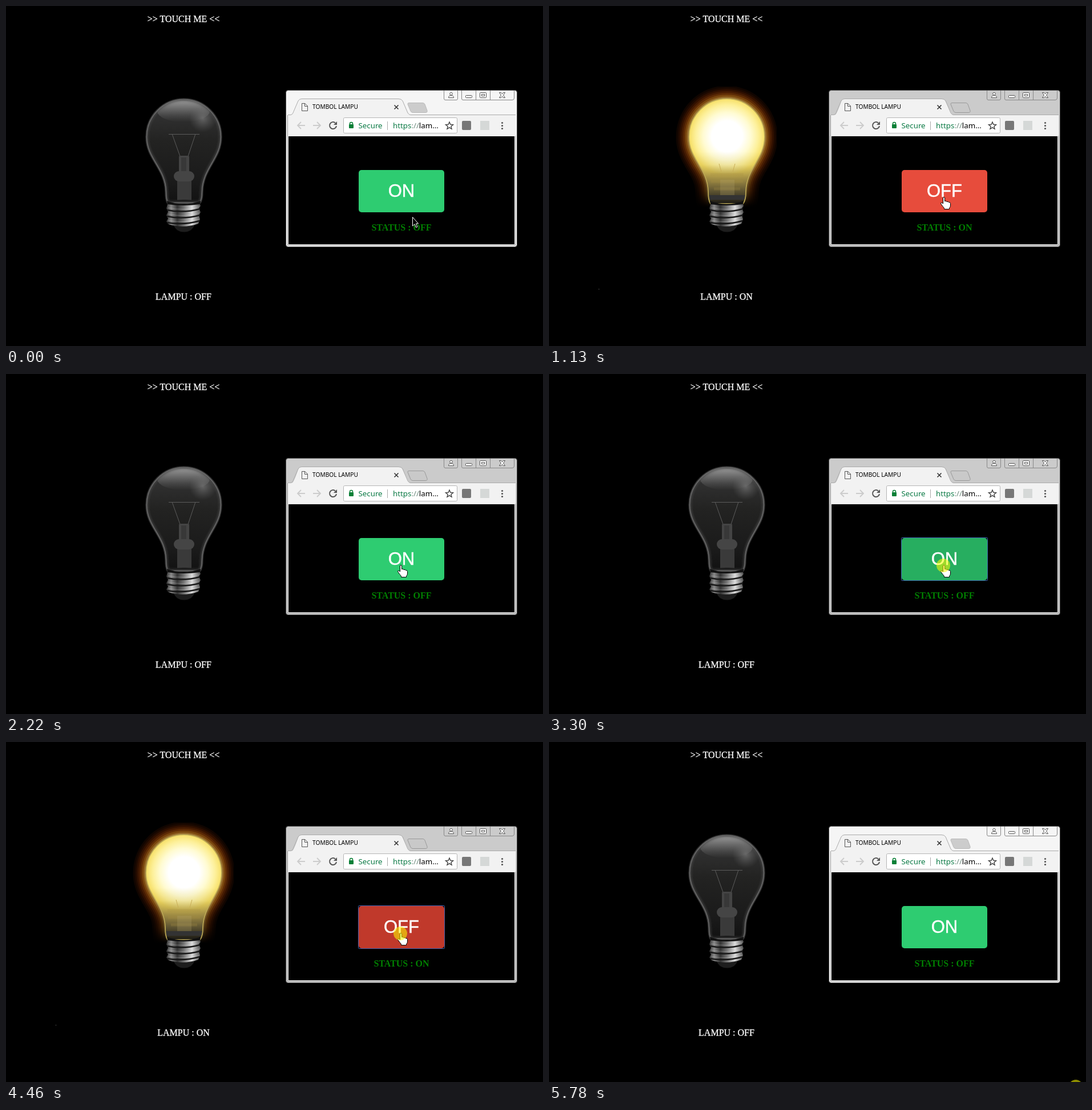
Animation, 941 px wide and 595 px high, one loop 5860 ms. Source, as an HTML page:

```html
<!DOCTYPE html>
<html lang="id">
<head>
<meta charset="utf-8">
<title>Lampu</title>
<style>
  html, body { margin: 0; height: 100%; background: #000; overflow: hidden; }
  svg { display: block; width: 100%; height: 100%; }
  .serif { font: 16px "Liberation Serif", "Times New Roman", serif; text-anchor: middle; fill: #fff; }
  .bright { stroke: #fff; stroke-width: .3px; }
  .ui { font: 13.3px "Noto Sans", Tahoma, sans-serif; }
  #label { font: 31px "Liberation Sans", Arial, sans-serif; text-anchor: middle; fill: #fff; stroke: #fff; stroke-width: .5px; }
  .line { fill: none; stroke: #555; }
  #win { --frame: #cbcbcb; --tab: #c9c9c9; --edge: #999; }
  #win.idle { --frame: #f5f5f5; --tab: #cccccc; --edge: #bbb; }
  .frame { fill: var(--frame); }
</style>
</head>
<body>
<svg viewBox="0 0 941 595">
  <defs>
    <path id="glass" d="M311.5 162C348 162 378 192 378 229C378 268 346 284 345 325Q345 340 340 346H283Q279 340 279 325C278 284 245 268 245 229C245 192 275 162 311.5 162Z"/>
    <clipPath id="inGlass"><use href="#glass"/></clipPath>
    <clipPath id="glowBox"><rect x="222" y="141" width="177" height="215"/></clipPath>
    <linearGradient id="dark" x2="0" y2="1">
      <stop offset="0" stop-color="#4a4a4a"/><stop offset=".16" stop-color="#303030"/>
      <stop offset=".4" stop-color="#232322"/><stop offset=".8" stop-color="#1a1a1a"/><stop offset="1" stop-color="#111"/>
    </linearGradient>
    <linearGradient id="shine" x2="0" y2="1">
      <stop offset="0" stop-color="#bbb" stop-opacity=".7"/><stop offset="1" stop-color="#888" stop-opacity="0"/>
    </linearGradient>
    <radialGradient id="spot">
      <stop offset="0" stop-color="#999" stop-opacity=".5"/><stop offset="1" stop-color="#777" stop-opacity="0"/>
    </radialGradient>
    <radialGradient id="lit" gradientUnits="userSpaceOnUse" cx="312" cy="228" r="100">
      <stop offset=".27" stop-color="#fff"/><stop offset=".42" stop-color="#fffbd2"/>
      <stop offset=".55" stop-color="#fdf09a"/><stop offset=".67" stop-color="#f6de62"/><stop offset="1" stop-color="#d8bd58"/>
    </radialGradient>
    <linearGradient id="fade" gradientUnits="userSpaceOnUse" x1="0" y1="255" x2="0" y2="346">
      <stop offset="0" stop-color="#8a7636" stop-opacity="0"/><stop offset=".25" stop-color="#857233" stop-opacity=".12"/>
      <stop offset=".5" stop-color="#756434" stop-opacity=".6"/>
      <stop offset=".76" stop-color="#4a432c" stop-opacity=".87"/><stop offset="1" stop-color="#191813"/>
    </linearGradient>
    <linearGradient id="dusk" gradientUnits="userSpaceOnUse" x1="0" y1="280" x2="0" y2="352">
      <stop offset="0" stop-opacity="0"/><stop offset=".6" stop-opacity=".45"/><stop offset="1"/>
    </linearGradient>
    <linearGradient id="metal">
      <stop offset="0" stop-color="#333"/><stop offset=".14" stop-color="#8a8a8a"/><stop offset=".32" stop-color="#343434"/>
      <stop offset=".5" stop-color="#707070"/><stop offset=".75" stop-color="#ddd"/><stop offset="1" stop-color="#4a4a4a"/>
    </linearGradient>
    <filter id="soft" x="-20%" y="-20%" width="140%" height="140%"><feGaussianBlur stdDeviation="2"/></filter>
  </defs>
  <rect width="941" height="595"/>
  <text class="serif bright" x="311" y="28">&gt;&gt; TOUCH ME &lt;&lt;</text>
  <text class="serif bright" x="311" y="514" id="lampText"></text>

  <g id="lampOff">
    <use href="#glass" fill="url(#dark)"/>
    <g clip-path="url(#inGlass)">
      <ellipse cx="311" cy="184" rx="46" ry="19" fill="url(#shine)"/>
      <ellipse cx="345" cy="197" rx="24" ry="24" fill="url(#spot)"/>
      <path d="M285 224.5H339M291 224L305 263M332 224L319 263" fill="none" stroke="#5b5b5b"/>
      <rect x="303" y="262" width="18" height="30" rx="2" fill="#444"/>
      <rect x="307" y="265" width="9" height="28" fill="#383838"/>
      <rect x="300" y="304" width="25" height="42" fill="#3a3a3a"/>
      <rect x="294" y="289" width="36" height="18" rx="9" fill="#454545"/>
      <ellipse cx="312" cy="346" rx="33" ry="7" fill="#111"/>
      <use href="#glass" fill="none" stroke="#4c4c4c" stroke-width="7" filter="url(#soft)"/>
      <use href="#glass" fill="none" stroke="#6c6c6c" stroke-width="4.500"/>
    </g>
    <use href="#glass" fill="none" stroke="#303030" stroke-width="1.600"/>
  </g>

  <g id="lampOn">
    <g clip-path="url(#glowBox)">
      <g id="glow" fill="none" stroke-linejoin="round"></g>
      <rect x="222" y="280" width="177" height="76" fill="url(#dusk)"/>
    </g>
    <use href="#glass" fill="url(#lit)"/>
    <g clip-path="url(#inGlass)">
      <use href="#glass" fill="url(#fade)"/>
      <path d="M298 276L302 290M326 276L322 290" stroke="#c9ae57"/>
      <path d="M283 295H341M284 307H340M289 320H335" stroke="#a88f43" stroke-width="5" opacity=".25"/>
      <rect x="300" y="304" width="25" height="28" fill="#b5a56b" opacity=".25"/>
      <path d="M281 335H344" stroke="#333" stroke-width="8"/>
    </g>
    <use href="#glass" fill="none" stroke="#baa654" stroke-width="1.800"/>
    <rect x="87" y="495" width="1" height="1" fill="#777"/>
  </g>

  <g id="base">
    <path d="M293 382H331Q326 395.500 312 395.500T293 382" fill="#1d1d1d"/>
    <path d="M284 344Q311 350 339 344L341 350L338 354L341 361L338 366L340 373L337 381Q311 390 285 382L281 377L284 372L281 366L284 360L281 354Z" fill="url(#metal)"/>
    <path d="M282 357Q311 363 340 355M282 368Q311 374 340 366M282 379Q311 384 339 376" fill="none" stroke="#181818" stroke-width="2.600"/>
    <path d="M284 353Q311 359 339 351M284 364Q311 370 339 362M284 375Q311 381 339 373" fill="none" stroke="#ddd" opacity=".3"/>
    <path d="M282 341Q311 352 341 341L340 347Q311 351 283 347Z" fill="#111"/>
  </g>

  <g id="win">
    <rect class="frame" x="490.500" y="147.500" width="405" height="274" rx="4" stroke="#4a4a4a"/>
    <path d="M493.500 191V418.500H892.500V191" fill="none" stroke="#999"/>
    <path d="M494.500 191V417.500H891.500V191" fill="none" stroke="#fff"/>
    <path d="M494 190.500H502Q506 186 512 167Q514 162.500 518 162.500H688Q693 162.500 695 167L705 188Q706 190.500 709 190.500H893V227.500H494Z" fill="#f2f2f2"/>
    <path d="M494 190.500H499Q502 190 503 187L512 166Q514 162.500 518 162.500H688Q693 162.500 695 166L704 187Q706 190.500 709 190.500H893" fill="none" stroke="#aaa"/>
    <path d="M706 169.500H730Q733 169.500 734 172L738 183Q739 186.500 735 186.500H713Q710 186.500 709 184L704 172Q703.500 169.500 706 169.500Z" fill="var(--tab)" stroke="var(--edge)"/>
    <g class="frame" stroke="#888">
      <path d="M767.500 148V162Q767.500 164.500 770 164.500H789Q791.500 164.500 791.500 162V148"/>
      <path d="M798.500 148V162Q798.500 164.500 801 164.500H887Q890.500 164.500 890.500 161V148M823.500 148V164M848.500 148V164"/>
    </g>
    <g fill="#fff" stroke="#555">
      <circle cx="780" cy="153.700" r="2.300"/>
      <path d="M775.500 160.500Q775.500 156.500 780 156.500T784.500 160.500Z"/>
      <rect x="805.500" y="156.500" width="11" height="4" rx="1"/>
      <rect x="830.500" y="151.500" width="11" height="9" rx="1"/><rect x="833.500" y="154.500" width="5" height="3"/>
      <path d="M864.500 151.500H867.500L869.500 154L871.500 151.500H874.500L871.500 156L874.500 160.500H871.500L869.500 158L867.500 160.500H864.500L867.500 156Z"/>
    </g>
    <path class="line" d="M518.500 170.500H524L528.500 175V183.500H518.500ZM523.500 170.500V175.500H528"/>
    <text class="ui" x="537" y="180" style="font-size:10.2px">TOMBOL LAMPU</text>
    <path d="M680.500 173.500L687.500 180.500M687.500 173.500L680.500 180.500" stroke="#333" stroke-width="1.600"/>
    <path d="M524 209H511M517 203L511 209L517 215M538 209H551M545 203L551 209L545 215" fill="none" stroke="#ccc" stroke-width="1.800"/>
    <path d="M577 204.500A6 6 0 1 0 579 210" fill="none" stroke="#555" stroke-width="2"/>
    <path d="M580 202V208H574Z" fill="#555"/>
    <rect x="591.500" y="195.500" width="199" height="27" rx="2" fill="#fff" stroke="#b5b5b5"/>
    <path d="M602.500 208V206A2.500 2.500 0 0 1 607.500 206V208" fill="none" stroke="#0b8037" stroke-width="1.500"/>
    <rect x="601" y="207" width="8" height="7" rx="1" fill="#0b8037"/>
    <text class="ui" x="617.500" y="214" fill="#0b7a45">Secure</text>
    <path d="M668.500 202V217" stroke="#aaa"/>
    <text class="ui" x="678" y="214"><tspan fill="#0b7a45">https</tspan><tspan fill="#6f8c7e">://</tspan>lam...</text>
    <path d="M777 203L778.800 207.300L783.500 207.700L779.900 210.700L781 215.200L777 212.700L773 215.200L774.100 210.700L770.500 207.700L775.200 207.300Z" fill="none" stroke="#444" stroke-width="1.400"/>
    <rect x="799" y="201" width="16" height="16" rx="2" fill="#777"/>
    <rect x="831" y="201" width="16" height="16" fill="#d5d8d7"/>
    <g fill="#555"><circle cx="869.500" cy="204.500" r="1.600"/><circle cx="869.500" cy="209.500" r="1.600"/><circle cx="869.500" cy="214.500" r="1.600"/></g>
    <rect x="495" y="228" width="396" height="189"/>
    <rect id="button" x="618" y="287" width="150" height="74" rx="5"/>
    <rect id="focus" x="617.500" y="286.500" width="151" height="75" rx="1" fill="none" stroke="#3f62b0"/>
    <text id="label" x="693" y="334"></text>
    <text class="serif" id="status" x="693" y="393" style="font-weight:bold;fill:#008000"></text>
  </g>

  <path id="arrow" d="M.500 .500V16L4 12.700L6.500 18.500L8.900 17.500L6.500 11.800H10.500Z" stroke="#fff"/>
  <path id="hand" d="M-.500 11V1Q-.500 -.500 1 -.500T2.500 1V6.500Q5 5.500 6 7.500Q8.500 6.500 9.500 8.500Q12 8 12.500 10.500V14Q12.500 17 10.500 18.500V20.500H1.500V18.500Q-1 16 -4 11.500Q-5 9.500 -3.500 9Q-2 9 -.500 11Z" fill="#fff" stroke="#000"/>
  <circle id="click" r="12" fill="#ff0" fill-opacity=".55"/>
</svg>
<script>
const $ = id => document.getElementById(id);
const LOOP = 5860;
const presses = [[740, 820], [1840, 1910], [3300, 3380], [4460, 4540]];
const lampFlips = [1130, 2220, 3610, 4770];
const LEAVE = 4770, STEP = 77.2;

const show = (id, on) => $(id).style.display = on ? "" : "none";
const place = (id, [x, y]) => $(id).setAttribute("transform", `translate(${x} ${y})`);

// Banded halo, widest ring first
["#100500", "#1d0900", "#301000", "#451b02", "#5d2b05", "#79460e", "#94692a"].forEach((color, i) => {
  $("glow").innerHTML += `<use href="#glass" stroke="${color}" stroke-width="${45 - i * 6.3}"/>`;
});

function pointer(t) {
  if (t < 70) return ["arrow", [712, 369]];
  if (t < 120) return ["hand", [698, 348]];
  if (t < LEAVE) return ["hand", [691, 335]];
  if (t >= 5390) return ["none", [923, 603]];
  const u = Math.min(7, Math.floor((t - LEAVE) / STEP)) / 7;
  const e = u * u * (3 - 2 * u);
  return ["arrow", [Math.round(717 + 202 * e), Math.round(375 + 212 * e)]];
}

function draw(t) {
  const switched = presses.filter(p => t >= p[1]).length % 2 === 1;
  const lit = lampFlips.filter(time => t >= time).length % 2 === 1;
  const pressed = presses.some(([a, b]) => t >= a && t < b);
  const away = t >= 5780;
  const [kind, pos] = pointer(t);

  show("lampOff", !lit);
  show("lampOn", lit);
  $("lampText").textContent = "LAMPU : " + (lit ? "ON" : "OFF");

  $("win").classList.toggle("idle", t < 740 || away);
  $("button").setAttribute("fill", switched
    ? (pressed ? "#c0392b" : "#e74c3c")
    : (pressed ? "#27ae60" : "#2ecc71"));
  $("label").textContent = switched ? "OFF" : "ON";
  $("status").textContent = "STATUS : " + (switched ? "ON" : "OFF");
  show("focus", pressed);

  for (const id of ["arrow", "hand"]) {
    show(id, id === kind);
    place(id, pos);
  }
  show("click", pressed || away);
  place("click", pos);
}

const start = performance.now();
function tick() {
  draw((performance.now() - start) % LOOP);
  requestAnimationFrame(tick);
}
tick();
</script>
</body>
</html>
```
